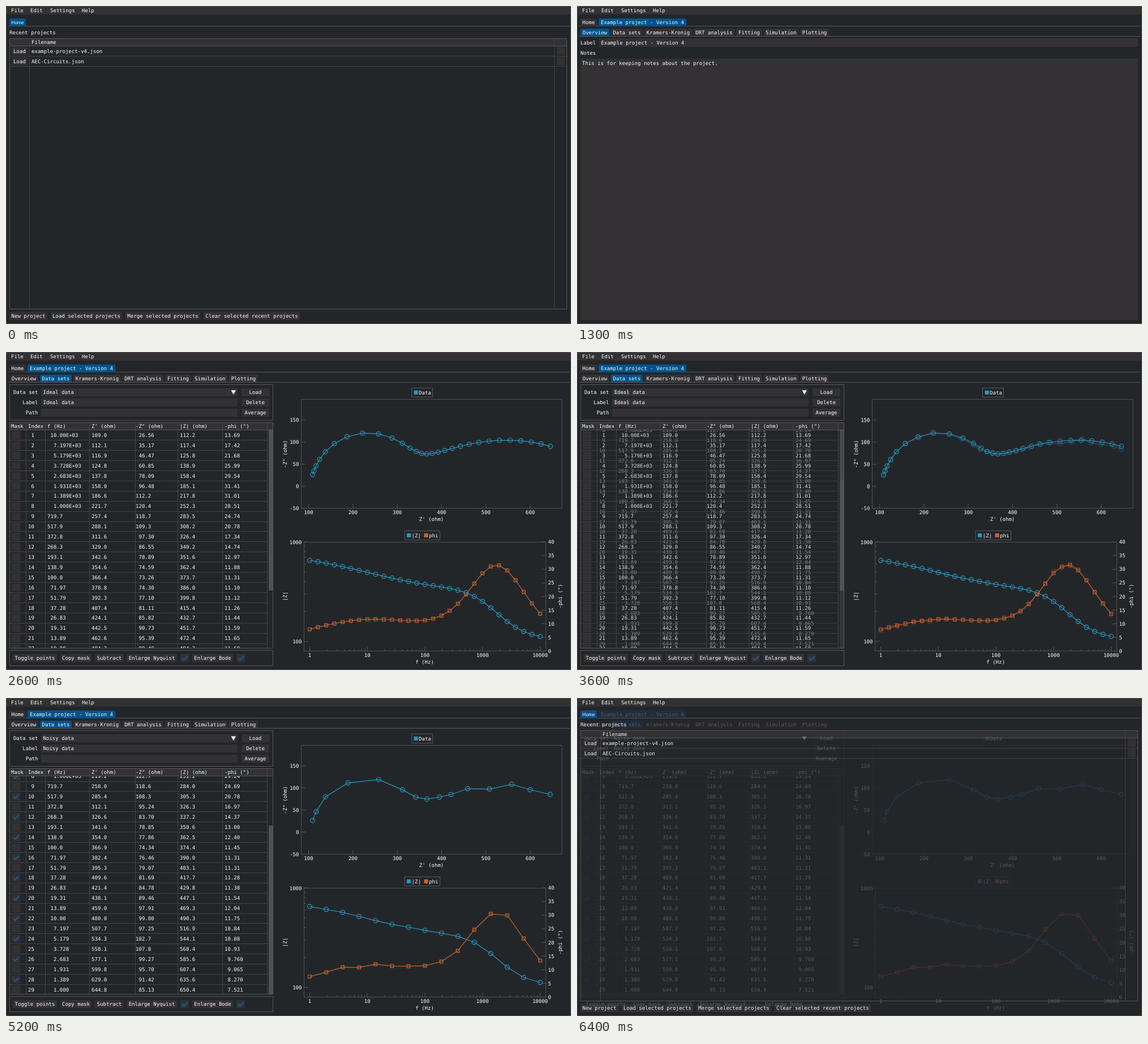
An HTML page with a canvas for the animation above (6500 ms loop, 998 by 561 pixels).

```html
<!DOCTYPE html>
<html lang="en">
<head>
<meta charset="utf-8">
<title>Project viewer</title>
<style>
html, body { margin: 0; width: 100%; height: 100%; overflow: hidden; background: #232629; }
canvas { display: block; }
</style>
</head>
<body>
<canvas id="stage" width="998" height="561"></canvas>
<script>
const W = 998, H = 561, HOLD = 1000, STEP = 100, SEGMENT = 1300;
const BG = '#232629', FIELD = '#333134', EDGE = '#56585b', LINE = '#424447', TEXT = '#fcfcfc',
  ACTIVE = '#00538a', BLUE = '#2999c1', ORANGE = '#c9652f', CHECK = '#12619c', THUMB = '#505154';
const MONO = '9.06px "DejaVu Sans Mono", monospace';
const SANS = '8.4px "Liberation Sans", Arial, sans-serif';

let g; // context being drawn to

function text(s, x, y, align = 'left', font = MONO) {
  g.font = font;
  g.textAlign = align;
  g.fillStyle = TEXT;
  g.fillText(s, x, y + 3.2);
}
function upright(s, x, y) {
  g.save();
  g.translate(x, y);
  g.rotate(-Math.PI / 2);
  text(s, 0, 0, 'center');
  g.restore();
}
function box(x1, y1, x2, y2, color = FIELD) {
  g.fillStyle = color;
  g.fillRect(x1, y1, x2 - x1, y2 - y1);
}
function outline(x1, y1, x2, y2, color = EDGE) {
  g.strokeStyle = color;
  g.lineWidth = 1;
  g.strokeRect(x1, y1, x2 - x1, y2 - y1);
}
function line(x1, y1, x2, y2, color = LINE) {
  path([[x1, y1], [x2, y2]], color, 1);
}
function path(pts, color, width) {
  g.strokeStyle = color;
  g.lineWidth = width;
  g.beginPath();
  pts.forEach(p => g.lineTo(p[0], p[1]));
  g.stroke();
}
function button(s, x1, x2, y) {
  box(x1, y - 7, x2, y + 7);
  text(s, (x1 + x2) / 2, y, 'center');
}
function checkbox(x, y, on) {
  box(x, y - 7, x + 15, y + 7);
  if (on) path([[x + 3, y], [x + 6, y + 3.5], [x + 12.5, y - 3]], CHECK, 1.8);
}
function tab(s, x1, x2, y, active, font) {
  g.fillStyle = active ? ACTIVE : FIELD;
  g.beginPath();
  g.roundRect(x1, y - 7, x2 - x1, 14, [2, 2, 0, 0]);
  g.fill();
  text(s, (x1 + x2) / 2, y, 'center', font);
}

// Impedance data: 29 points from 10 kHz to 1 Hz
const COUNT = 29;
const freq = i => 10 ** ((28 - i) / 7);

function point(i, re, im) {
  return { n: i + 1, f: freq(i), re, im, mod: Math.hypot(re, im), phi: Math.atan2(im, re) * 180 / Math.PI };
}
// R(RC)(RW) circuit
function circuit(i) {
  const w = 2 * Math.PI * freq(i), q = w * 200 * 8e-7, d = 1 + q * q;
  const b = 4e-4 * Math.sqrt(w / 2), a = b + 1 / 500, m = a * a + b * b;
  return point(i, 100 + 200 / d + a / m, 200 * q / d + b / m);
}
const ideal = Array.from({ length: COUNT }, (_, i) => circuit(i));
const noisy = [
  [109.1, 26], [112.7, 35.4], [117, 46], [125.3, 60.5], [138, 79.5], [158, 98.4], [188.6, 111],
  [219.2, 122.7], [258, 118.6], [285.4, 108.3], [312.1, 95.24], [326.6, 83.7], [341.6, 78.85],
  [354, 77.86], [366.9, 74.34], [382.4, 76.46], [395.3, 79.07], [409.6, 81.69], [421.4, 84.78],
  [438.1, 89.46], [459, 97.91], [480, 99.8], [507.7, 97.25], [534.3, 102.7], [558.1, 107.8],
  [577.1, 99.27], [599.8, 95.7], [629, 91.42], [644.8, 85.13]
].map(([re, im], i) => point(i, re, im));

// Four significant digits, decimal points aligned
function format(v, digits) {
  const big = v > 999.99, s = (big ? v / 1000 : v).toPrecision(4);
  return s.padStart(s.length + digits - s.indexOf('.')) + (big ? 'E+03' : '');
}

function frameTop() {
  box(0, 0, W, H, BG);
  box(1, 1, 997, 15);
  outline(0.5, 0.5, 997.5, 560.5, '#4a4c4f');
  text('File', 9, 8);
  text('Edit', 43, 8);
  text('Settings', 78, 8);
  text('Help', 134, 8);
  line(3, 35.5, 995, 35.5, EDGE);
}

function home() {
  frameTop();
  tab('Home', 6, 35, 29, true, SANS);
  text('Recent projects', 6, 47);
  box(7, 57, 991, 70);
  text('Filename', 45, 64);
  ['example-project-v4.json', 'AEC-Circuits.json'].forEach((name, i) => {
    const y = 79.5 + i * 18;
    button('Load', 10, 38, y);
    text(name, 45, y);
    box(973, y - 7.5, 987, y + 7);
    line(7, y + 9, 991, y + 9);
  });
  line(7, 70.5, 991, 70.5, EDGE);
  line(41.5, 57, 41.5, 535);
  line(968.5, 57, 968.5, 535);
  outline(6.5, 57.5, 990.5, 534.5);
  button('New project', 6, 73, 547);
  button('Load selected projects', 79, 205, 547);
  button('Merge selected projects', 211, 343, 547);
  button('Clear selected recent projects', 349, 519, 547);
}

function projectTabs(active) {
  frameTop();
  tab('Home', 6, 35, 29);
  tab('Example project - Version 4', 38, 193, 29, true);
  [['Overview', 6, 57], ['Data sets', 60, 116], ['Kramers-Kronig', 119, 203], ['DRT analysis', 206, 278],
   ['Fitting', 281, 327], ['Simulation', 330, 391], ['Plotting', 394, 445]]
    .forEach(([s, x1, x2]) => tab(s, x1, x2, 47, s === active));
  line(3, 53.5, 995, 53.5, EDGE);
}

function overview() {
  projectTabs('Overview');
  text('Label', 6, 65);
  box(39, 57, 991, 72);
  text('Example project - Version 4', 42.5, 65);
  text('Notes', 6, 83);
  box(6, 93, 991, 554);
  text('This is for keeping notes about the project.', 9, 101);
}

function table(rows, firstY, thumbY, masked) {
  const cols = [35.5, 69.5, 147.5, 228.5, 303.5, 382.5, 461.5];
  box(7, 124, 472, 137);
  ['Mask', 'Index', 'f (Hz)', "Z' (ohm)", '-Z" (ohm)', '|Z| (ohm)', '-phi (°)']
    .forEach((s, i) => text(s, [9, 39, 73, 151, 229, 307, 386][i], 131));
  g.save();
  g.beginPath();
  g.rect(7, 138, 465, 384);
  g.clip();
  rows.forEach((r, i) => {
    const y = firstY + i * 17.92;
    if (y < 125 || y > 535) return;
    checkbox(10, y, masked && r.n % 2 === 0);
    text(r.n, 50, y, 'right');
    text(format(r.f, 3), 73, y);
    text(format(r.re, 3), 151, y);
    text(format(r.im, 3), 229, y);
    text(format(r.mod, 3), 307, y);
    text(format(r.phi, 2), 386, y);
    const edge = Math.round(y + 8.5) + 0.5;
    line(7, edge, 462, edge);
  });
  box(464, thumbY, 471, thumbY + 297 - (thumbY < 200 ? 14 : 0), THUMB);
  g.restore();
  cols.forEach(x => line(x, 124, x, 522));
  line(7, 137.5, 472, 137.5, EDGE);
  outline(6.5, 124.5, 471.5, 522.5);
}

function series(pts, color, square) {
  path(pts, color, 1.2);
  g.lineWidth = 1.2;
  for (const [x, y] of pts) {
    g.beginPath();
    if (square) g.rect(x - 2.8, y - 2.8, 5.6, 5.6);
    else g.arc(x, y, 3.9, 0, 7);
    g.stroke();
  }
}
function legend(x1, x2, y, items) {
  outline(x1, y - 8, x2, y + 8);
  for (const [s, x, color] of items) {
    box(x, y - 3.5, x + 7, y + 3.5, color);
    text(s, x + 8.6, y);
  }
}

function nyquist(pts, zero) {
  const X = v => 534.5 + (v - 100) * 0.783, Y = v => zero - v * 0.78;
  outline(521.5, 83.5, 982, 275.5, '#505255');
  for (let v = 100; v <= 600; v += 100) {
    line(X(v), 268, X(v), 275, EDGE);
    text(v, X(v), 283, 'center');
  }
  for (let v = -50; v <= 150; v += 50) {
    if (Y(v) > 276) continue;
    line(522, Y(v), 529, Y(v), EDGE);
    text(v, 517.5, Y(v), 'right');
  }
  text("Z' (ohm)", 751.5, 295, 'center');
  upright('-Z" (ohm)', 492.5, 180);
  series(pts.map(p => [X(p.re), Y(p.im)]), BLUE);
  legend(716.5, 753.5, 71.5, [['Data', 720.5, BLUE]]);
}

function bode(pts) {
  const X = f => 536.5 + Math.log10(f) * 101.75;
  const M = z => 335 + (3 - Math.log10(z)) * 175.5;
  const P = p => 527.5 - p * 4.81;
  outline(526.5, 335.5, 953.5, 527.5, '#505255');
  for (let e = 0; e <= 4; e++) {
    const f = 10 ** e;
    line(X(f), 520, X(f), 527, EDGE);
    text(f, X(f), 535, 'center');
    for (let k = 2; k < 10 && e < 4; k++) line(X(k * f), 524, X(k * f), 527, EDGE);
  }
  for (let k = 1; k <= 10; k++) line(527, M(k * 100), k % 9 === 1 ? 534 : 530, M(k * 100), EDGE);
  text('1000', 522.5, 335.5, 'right');
  text('100', 522.5, 511, 'right');
  for (let p = 0; p <= 40; p += 5) {
    line(946, P(p), 953, P(p), EDGE);
    text(p, 957.5, P(p));
  }
  text('f (Hz)', 739.5, 546.5, 'center');
  upright('|Z|', 492.5, 431);
  upright('-phi (°)', 978.5, 431);
  series(pts.map(p => [X(p.f), M(p.mod)]), BLUE);
  series(pts.map(p => [X(p.f), P(p.phi)]), ORANGE, true);
  legend(704, 766.5, 323.5, [['|Z|', 708, BLUE], ['phi', 738.5, ORANGE]]);
}

function dataSets(name, rows, firstY, thumbY, zero, masked) {
  projectTabs('Data sets');
  outline(6.5, 57.5, 471.5, 120.5);
  [['Data set', name, 'Load'], ['Label', name, 'Delete'], ['Path', '', 'Average']].forEach(([label, value, action], i) => {
    const y = 71 + i * 18;
    text(label, 56.5, y, 'right');
    box(62, y - 7, 409, y + 7);
    text(value, 65.5, y);
    button(action, 416, 465, y);
  });
  g.fillStyle = TEXT;
  g.beginPath();
  g.moveTo(397.5, 67.5);
  g.lineTo(406, 67.5);
  g.lineTo(401.8, 75);
  g.fill();

  table(rows, firstY, thumbY, masked);

  outline(6.5, 526.5, 471.5, 553.5);
  button('Toggle points', 12, 90, 540);
  button('Copy mask', 96, 151, 540);
  button('Subtract', 157, 208, 540);
  button('Enlarge Nyquist', 213, 302, 540);
  checkbox(308, 540, true);
  button('Enlarge Bode', 329, 401, 540);
  checkbox(407, 540, true);

  const shown = masked ? rows.filter(r => r.n % 2) : rows;
  nyquist(shown, zero);
  bode(shown);
}

const scenes = [
  home,
  overview,
  () => dataSets('Ideal data', ideal, 146.7, 138, 237, false),
  () => dataSets('Noisy data', noisy, 12.6, 225, 237.8, false),
  () => dataSets('Noisy data', noisy, 12.6, 225, 236.4, true)
].map(draw => {
  const c = document.createElement('canvas');
  c.width = W;
  c.height = H;
  g = c.getContext('2d', { willReadFrequently: true });
  g.textRendering = 'geometricPrecision';
  draw();
  return g.getImageData(0, 0, W, H);
});

// Cross-fade in linear light
const FADE = [0, 0.25, 0.6, 0.9];
const toLinear = Float32Array.from({ length: 256 }, (_, v) => {
  const s = v / 255;
  return s <= 0.04045 ? s / 12.92 : ((s + 0.055) / 1.055) ** 2.4;
});
const toByte = Uint8Array.from({ length: 8193 }, (_, v) => {
  const l = v / 8192;
  return Math.round(255 * (l <= 0.0031308 ? l * 12.92 : 1.055 * l ** (1 / 2.4) - 0.055));
});
function mix(from, to, k) {
  const out = new ImageData(W, H), a = from.data, b = to.data, d = out.data;
  for (let i = 0; i < d.length; i++) {
    d[i] = a[i] === b[i] ? a[i] : toByte[Math.round(8192 * (toLinear[a[i]] * (1 - k) + toLinear[b[i]] * k))];
  }
  return out;
}

const stage = document.getElementById('stage').getContext('2d');
const cache = {};
let last = '';

function render(ms) {
  const t = ms % (SEGMENT * scenes.length);
  const i = Math.floor(t / SEGMENT), u = t % SEGMENT;
  const step = u < HOLD ? 0 : 1 + Math.floor((u - HOLD) / STEP);
  const key = i + ':' + step;
  if (key === last) return;
  last = key;
  cache[key] ??= step ? mix(scenes[i], scenes[(i + 1) % scenes.length], FADE[step]) : scenes[i];
  stage.putImageData(cache[key], 0, 0);
}
function tick(now) {
  render(Math.max(0, now));
  requestAnimationFrame(tick);
}
render(0);
requestAnimationFrame(tick);
</script>
</body>
</html>
```
